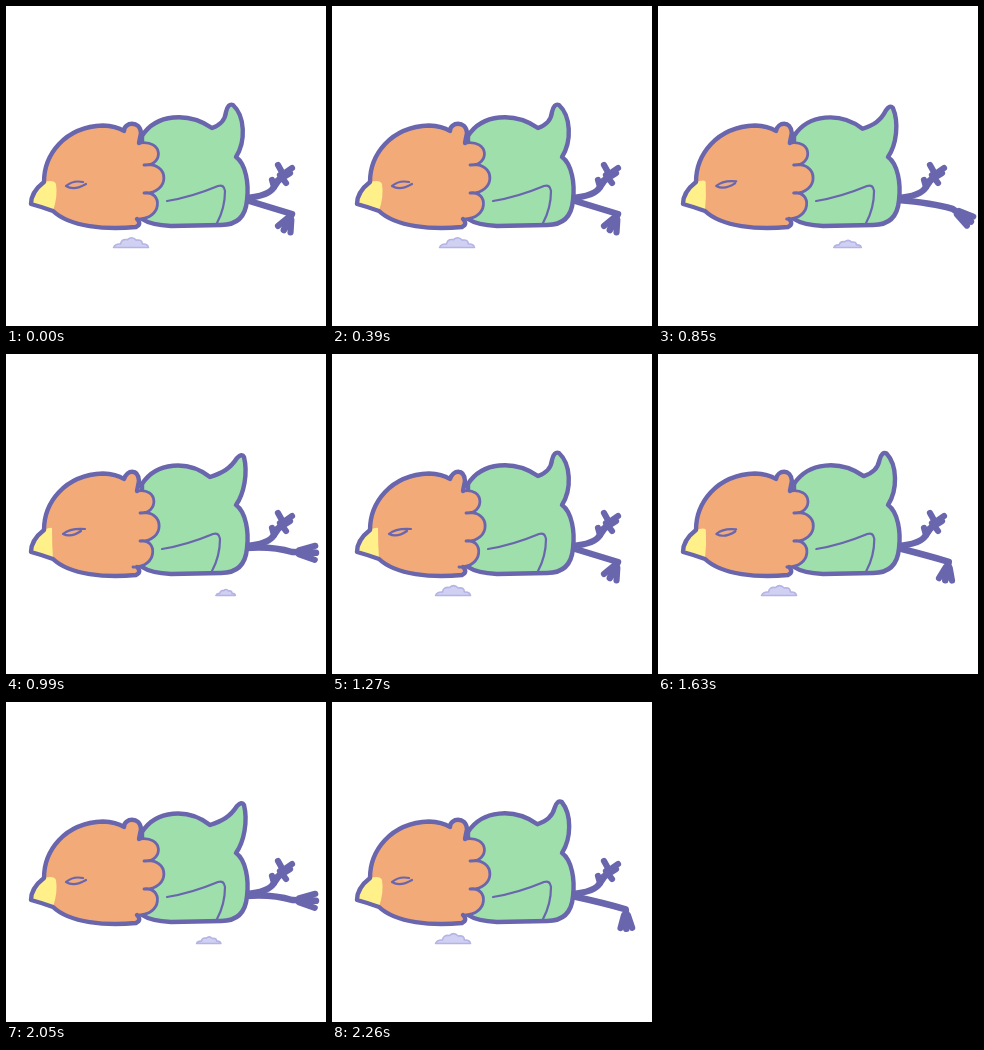
Recreate the animation shown at these times as an HTML page. Size 320 by 320 pixels, loop 2.33 s.

```html
<!DOCTYPE html>
<html lang="en">
<head>
<meta charset="utf-8">
<title>Sleepy bird</title>
<style>
  html, body { margin: 0; width: 100%; height: 100%; overflow: hidden; background: #fff; }
  svg { display: block; width: 100vw; height: 100vh; }
  path { fill: none; stroke: #6966ae; stroke-width: 4.4; stroke-linecap: round; stroke-linejoin: round; }
  .leg { stroke-width: 6.5; }
  .toes { stroke-width: 6.2; }
  .fine { stroke-width: 2.2; }
  #body { fill: #9fdfab; }
  #head { fill: #f1aa78; stroke: none; }
  #ruffle { stroke-width: 2.8; }
  #beak { fill: #fff08a; stroke: none; }
  #puff { fill: #d0d0f3; stroke: #b5b4e4; stroke-width: 1.6; }
</style>
</head>
<body>
<svg viewBox="0 0 320 320">
  <path id="puff"/>
  <path class="leg" d="M240 192 Q263 190 268 181 L277 168"/>
  <path class="toes" d="M268 181 L266 174 M277 168 L272 159 M276 169 L286 162 M274 169 L280 177 M268 177 L284 167"/>
  <path class="leg" id="leg"/>
  <path class="toes" id="toes"/>
  <path id="body"/>
  <path class="fine" id="wing" d="M161 195 C180 192 200 185 212 180 Q218 178 219 185 Q219 202 211 217"/>
  <path id="head"/>
  <path id="beak"/>
  <path id="ruffle"/>
  <path id="skull"/>
  <path class="fine" id="eye"/>
</svg>
<script>
const LOOP = 2330, STEP = 70, HOLD = 180, KICK_STEPS = 10;
const cycles = [
  { start: 0, kick: 570, slide: 550, home: 125 },
  { start: 1270, kick: 1630, slide: 1670, home: 121 }
];

const el = id => document.getElementById(id);
const set = (id, d) => el(id).setAttribute("d", d);
const clamp = v => Math.max(0, Math.min(1, v));

// Each cycle rests in two held poses, then kicks in even steps
function poseAt(t) {
  const c = cycles[t < cycles[1].start ? 0 : 1];
  if (t < c.kick - HOLD) return { c, n: -1, time: c.start };
  const n = Math.min(KICK_STEPS - 1, Math.floor((t - c.kick) / STEP));
  return n < 0 ? { c, n: -1, time: c.kick - HOLD } : { c, n, time: c.kick + n * STEP };
}

// k: 0 faces the viewer slightly, 1 is turned away
function drawHead(k) {
  const top = 133 - 2 * k;
  const skull = `M131 213 Q136 218 130 221 C100 224 64 221 47 205 Q36 201 25 198 Q25 186 38 176 ` +
    `C38 149 58 121 97 119.5 Q110 120 118 125 C${118 + 3 * k} 116 ${134 - 2 * k} 114 ${135 - 2 * k} 127 L${top} 137`;
  const bump = (reach, y0, x, y1) =>
    `C${reach - 5 * k} ${y0 - 4} ${reach - 5 * k} ${y1 + 1} ${x - 4 * k} ${y1} `;
  const ruffle = bump(158, 137, 138, 159) + bump(164.5, 159, 138, 187) + bump(157, 188, 131, 213);
  set("skull", skull);
  set("ruffle", `M${top} 137 ${ruffle}`);
  set("head", `${skull} ${ruffle} Z`);

  const edge = 50 - 4 * k;
  set("beak", `M38 176 Q${edge - 2} 173 ${edge} ${178 - 4 * k} Q${52 - 6 * k} 190 47 205 Q36 201 25 198 Q25 186 38 176 Z`);

  const x = 60 - 3 * k;
  set("eye", `M${x} 180 Q${x + 7} 174 ${77 + 2 * k} ${176 - k} M${x} 180 Q${x + 8} ${185 - k} ${80 - 5 * k} ${178 - k}`);
  el("wing").setAttribute("transform", `translate(${-5 * k} 0)`);
}

// s: 0 at rest, 1 with the leg stretched out
function drawBody(s) {
  const tip = 11 * s;
  set("body", `M136 130 C150 108 182 105.5 ${206 - 2 * s} ${122 + s} ` +
    `C${214 + 2 * s} 119 ${219 + 5 * s} 115 ${220 + tip} ${106 - 2 * s} ` +
    `Q${222 + tip + 3 * s} ${97 + 2 * s} ${227 + tip} ${99 + 4 * s} ` +
    `C${239 + 3 * s} ${110 + 9 * s} ${240 - 2 * s} ${135 + 5 * s} 230 151 ` +
    `C240 158 243 178 241 194 Q239 219 215 219 L165 220 Q145 219 136 213 Z`);
}

function drawLeg(s) {
  const kx = 286 + 11 * Math.sin(Math.PI * s), ky = 208 - 10 * s * s;
  const angle = (117 - 115 * s) * Math.PI / 180;
  const len = 18 + 6 * s, spread = 3 + 4 * Math.abs(Math.cos(Math.PI * s));
  const dx = Math.cos(angle), dy = Math.sin(angle);
  const at = (along, side) => `${kx + dx * along - dy * side} ${ky + dy * along + dx * side}`;
  set("leg", `M240 194 Q${kx - 20} ${ky - 6} ${kx} ${ky} L${at(len, 0)}`);
  set("toes", [-1, 0, 1].map(i => `M${at(len * .3, i * 2)} L${at(len - 1, i * spread)}`).join(" "));
}

function drawPuff({ c, n, time }) {
  let x = Math.max(c.home, c.home + (time - c.slide) * .215);
  if (n === KICK_STEPS - 1) x = c.home;
  if (x > 230) return set("puff", "");
  const w = 35 - .0016 * (x - 121) ** 2, h = 10 - (x - 121) * .04;
  const at = (u, v) => `${x + u * w / 2} ${241.5 - v * h}`;
  set("puff", `M${at(-1, 0)} Q${at(-.9, .4)} ${at(-.6, .35)} Q${at(-.55, .9)} ${at(-.2, .8)} ` +
    `Q${at(.05, 1.2)} ${at(.3, .75)} Q${at(.65, .85)} ${at(.65, .35)} Q${at(.95, .4)} ${at(1, 0)} Z`);
}

function draw(t) {
  const pose = poseAt(t), { n, time } = pose;
  const swing = n < 0 ? 0 : Math.min((n + 1) / 7, (KICK_STEPS - n) / 4);
  const rise = clamp((time - 390) / 600) ** 2, fall = clamp((2050 - time) / 780);
  drawHead(Math.min(rise, fall));
  drawBody(swing);
  drawLeg(swing);
  drawPuff(pose);
}

const begin = performance.now();
function tick() {
  draw((performance.now() - begin) % LOOP);
  requestAnimationFrame(tick);
}
tick();
</script>
</body>
</html>
```
